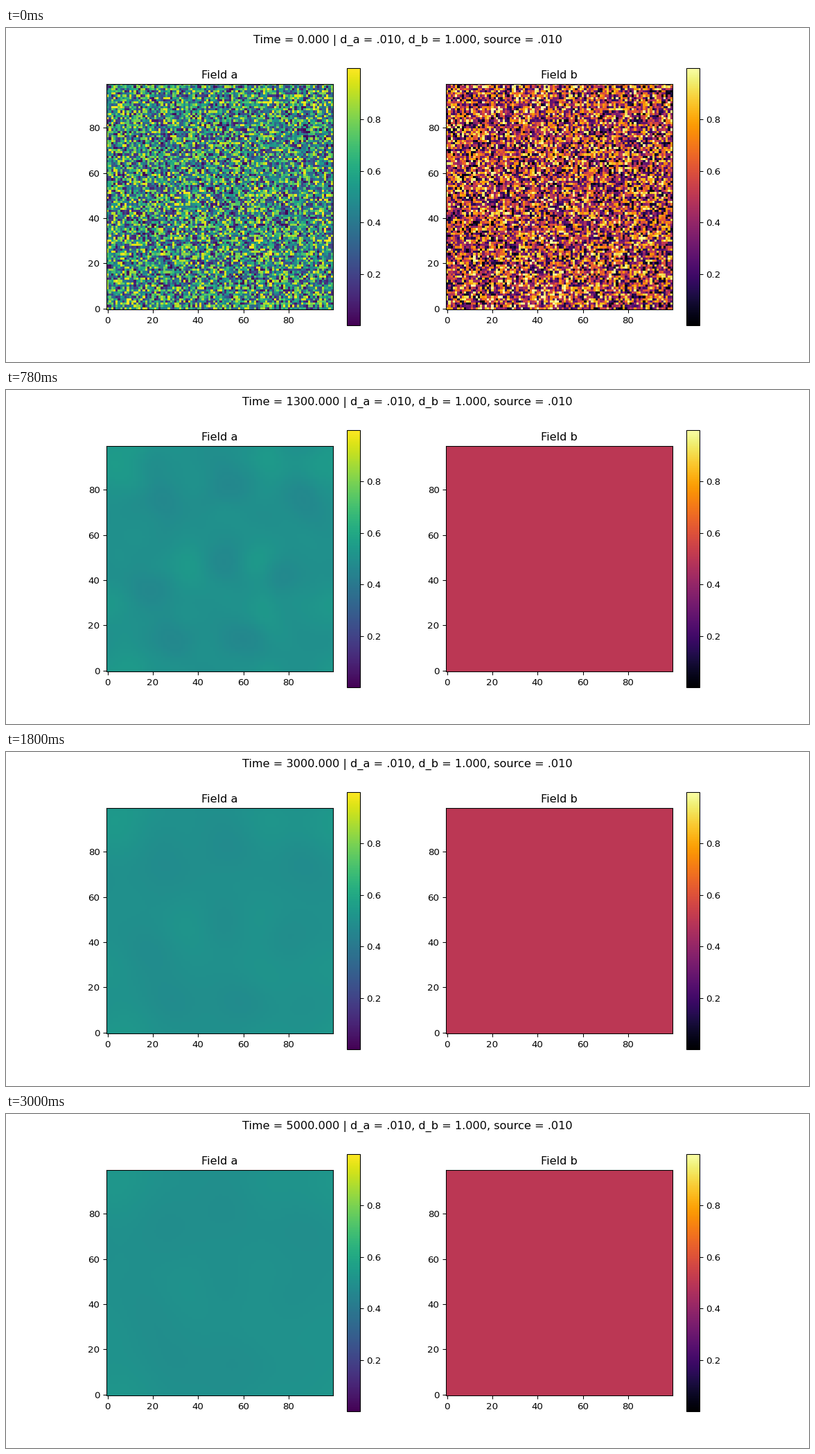
Animation of 1159x483 px, one loop 3060 ms. Source, as a matplotlib script:

```python
import numpy as np
import matplotlib.pyplot as plt
from matplotlib.animation import FuncAnimation

SIZE = 100
FRAMES = 51
INTERVAL = 60
TIME_STEP = 100
D_A, D_B = 0.01, 1.0
MEAN = 0.502

# Eigenvalues of the periodic five-point Laplacian
mode = 2 - 2 * np.cos(2 * np.pi * np.fft.fftfreq(SIZE))
decay_rate = mode[:, None] + mode[None, :]


def diffuse(field, amount):
    """Periodic heat flow for a given diffusivity times time."""
    spectrum = np.fft.fft2(field) * np.exp(-decay_rate * amount)
    return np.fft.ifft2(spectrum).real


def start_field(rng, high, low, mass, spread):
    """Uniform noise whose coarse part is replaced by patches at key points."""
    noise = rng.random((SIZE, SIZE))
    patches = np.zeros((SIZE, SIZE))
    for points, sign in ((high, 1), (low, -1)):
        for x, y in points:
            patches[y, x] += sign * mass / len(points)
    return noise + diffuse(patches - noise + MEAN, spread)


rng = np.random.default_rng(4)
start_a = start_field(
    rng,
    high=[(36, 46), (67, 48), (70, 28), (10, 4), (5, 90), (94, 90), (71, 93), (99, 30)],
    low=[(53, 83), (25, 72), (17, 36), (53, 49), (77, 40), (60, 14), (28, 14), (88, 76)],
    mass=68, spread=6)
start_b = start_field(
    rng, high=[(42, 1)], low=[(71, 54), (3, 34), (95, 8)], mass=55, spread=40)

fig, axes = plt.subplots(1, 2, figsize=(12, 5), dpi=96.602)


def add_panel(ax, field, title, cmap):
    image = ax.imshow(field, origin="lower", cmap=cmap, vmin=1e-4, vmax=0.9999)
    ax.set_title(title)
    fig.colorbar(image, ax=ax)
    return image


image_a = add_panel(axes[0], start_a, "Field a", "viridis")
image_b = add_panel(axes[1], start_b, "Field b", "inferno")
heading = fig.suptitle("")


def update(frame):
    time = frame * TIME_STEP
    image_a.set_data(diffuse(start_a, D_A * time))
    image_b.set_data(diffuse(start_b, D_B * time))
    heading.set_text(f"Time = {time:.3f} | d_a = .010, d_b = 1.000, source = .010")
    return image_a, image_b, heading


animation = FuncAnimation(fig, update, frames=FRAMES, interval=INTERVAL,
                          repeat=True, repeat_delay=0, blit=False)
plt.show()
```
